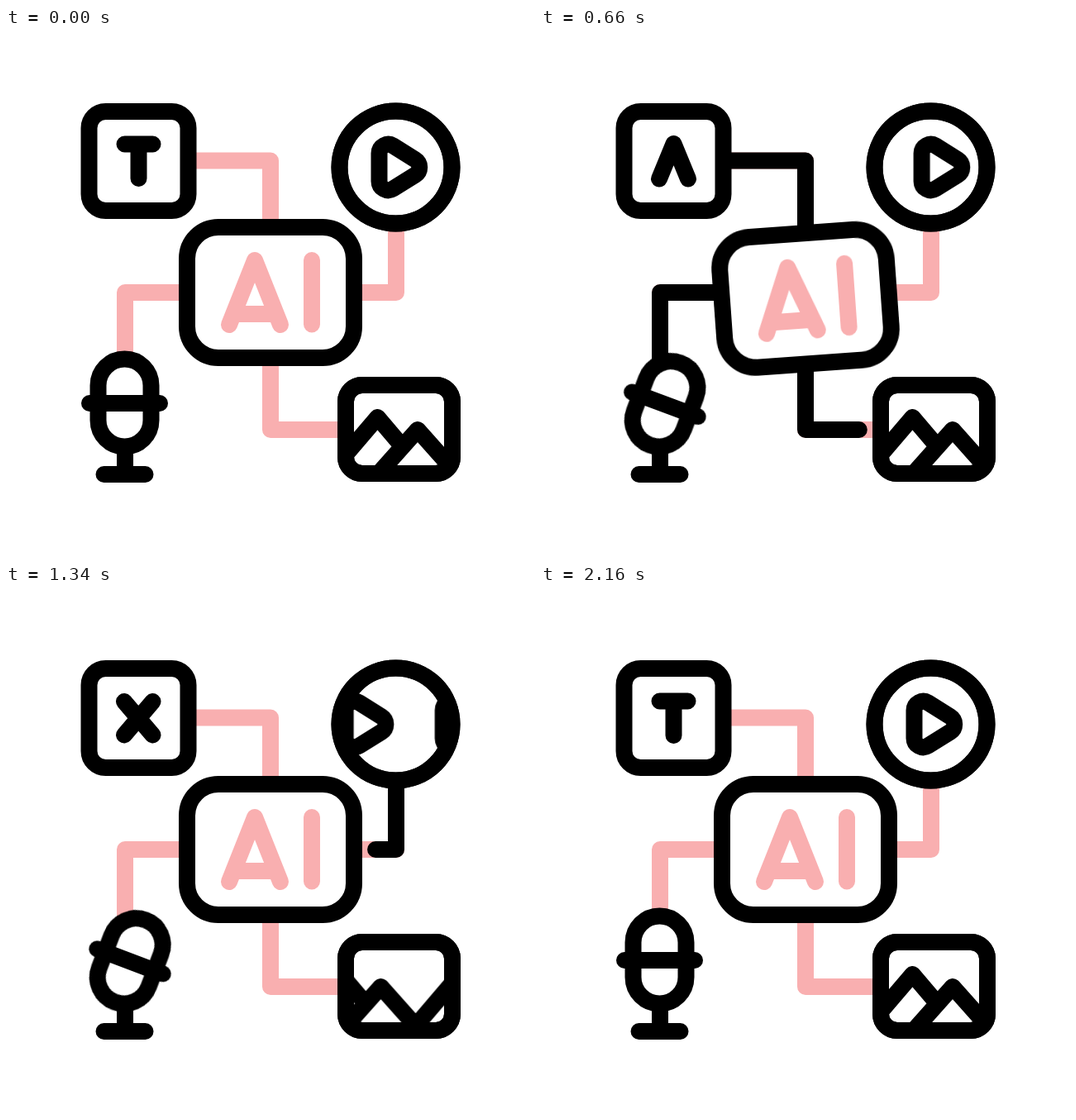
These frames come from a looping animation (640x640 px, 2400 ms). An HTML page:

```html
<!DOCTYPE html>
<html lang="en">
<head>
<meta charset="utf-8">
<title>AI media hub</title>
<style>
  html, body { margin: 0; width: 100%; height: 100%; overflow: hidden; background: #fff; }
  svg { display: block; width: 100vw; height: 100vh; }

  .ink, .pink { fill: none; stroke: #000; stroke-width: 20; stroke-linecap: round; stroke-linejoin: round; }
  .pink { stroke: #f9afb0; }
  .solid { fill: #fff; }

  .move, .trim { animation: 2400ms linear infinite; }
  .trim { stroke-dasharray: 100 300; stroke-dashoffset: 110; }

  /* Connectors: drawn away from the hub, then erased the same way */
  .to-text { animation-name: to-text; }
  .to-mic { animation-name: to-mic; }
  .to-image { animation-name: to-image; }
  .to-video { animation-name: to-video; }
  @keyframes to-text {
    0%, 6.667% { stroke-dashoffset: 110; }
    16.667%, 28.333% { stroke-dashoffset: 0; }
    38.333%, 100% { stroke-dashoffset: -110; }
  }
  @keyframes to-mic {
    0%, 12.5% { stroke-dashoffset: 110; }
    22.5%, 40% { stroke-dashoffset: 0; }
    50%, 100% { stroke-dashoffset: -110; }
  }
  @keyframes to-image {
    0%, 18.75% { stroke-dashoffset: 110; }
    28.75%, 44.167% { stroke-dashoffset: 0; }
    54.167%, 100% { stroke-dashoffset: -110; }
  }
  @keyframes to-video {
    0%, 27.5% { stroke-dashoffset: 110; }
    37.5%, 52.75% { stroke-dashoffset: 0; }
    62.75%, 100% { stroke-dashoffset: -110; }
  }

  /* Hub sway */
  .hub { transform-origin: 320px 320px; animation-name: sway; }
  @keyframes sway {
    0% { transform: translateY(0) rotate(0deg); animation-timing-function: cubic-bezier(.25, 0, .4, 1); }
    19.167% { transform: translateY(9.5px) rotate(-5.5deg); animation-timing-function: cubic-bezier(.75, 0, .65, 1); }
    40.833% { transform: translateY(-8px) rotate(5.7deg); animation-timing-function: ease-in-out; }
    55%, 100% { transform: translateY(0) rotate(0deg); }
  }

  /* Letters change in hard cuts */
  .glyph { visibility: hidden; animation-name: glyph; animation-timing-function: step-end; }
  .first { animation-name: first; }
  @keyframes glyph {
    0% { visibility: visible; }
    16.667%, 100% { visibility: hidden; }
  }
  @keyframes first {
    0% { visibility: visible; }
    16.667% { visibility: hidden; }
    66.667%, 100% { visibility: visible; }
  }

  /* Microphone tilt and sound rays */
  .mic { transform-origin: 143px 472.5px; animation-name: tilt; }
  @keyframes tilt {
    0%, 6.667% { transform: rotate(0deg); animation-timing-function: cubic-bezier(.37, 0, .63, 1); }
    35%, 47.083% { transform: rotate(24.3deg); animation-timing-function: cubic-bezier(.37, 0, .63, 1); }
    82.083%, 100% { transform: rotate(0deg); }
  }
  .ray { animation-name: ray; }
  @keyframes ray {
    0%, 34.583% { stroke-dashoffset: 110; }
    42.083%, 44.583% { stroke-dashoffset: 0; }
    50.833%, 100% { stroke-dashoffset: -110; }
  }

  /* Video: the ring and sign shrink, then signs run past */
  .ring { animation-name: ring; animation-timing-function: ease-in-out; }
  @keyframes ring {
    0%, .833%, 22.5%, 100% { r: 68px; }
    11.667% { r: 58px; }
  }
  .sign { vector-effect: non-scaling-stroke; }
  .shrink { transform-origin: 476px 168.5px; animation-name: shrink; animation-timing-function: ease-in-out; }
  @keyframes shrink {
    0%, .833%, 22.5%, 100% { transform: scale(1); }
    11.667% { transform: scale(.73); }
  }
  .signs { animation-name: run; }
  @keyframes run {
    0%, 20% { transform: translateX(0); animation-timing-function: cubic-bezier(.333, 0, .667, .4); }
    27.5% { transform: translateX(9px); animation-timing-function: cubic-bezier(.333, .168, .667, .457); }
    40.833% { transform: translateX(66px); animation-timing-function: cubic-bezier(.333, .27, .667, .823); }
    55.833% { transform: translateX(195px); animation-timing-function: cubic-bezier(.333, .95, .667, .79); }
    76.667% { transform: translateX(227px); animation-timing-function: cubic-bezier(.333, .444, .667, 1); }
    89.167%, 100% { transform: translateX(236px); }
  }

  /* Picture: the hills scroll by one period */
  .hills { animation-name: scroll; }
  @keyframes scroll {
    0%, 32.5% { transform: translateX(0); animation-timing-function: cubic-bezier(.37, 0, .63, 1); }
    70%, 100% { transform: translateX(144px); }
  }
</style>
</head>
<body>
<svg viewBox="0 0 640 640">
  <defs>
    <clipPath id="lens"><circle cx="471.5" cy="168.5" r="68"/></clipPath>
    <clipPath id="view"><rect x="411" y="432" width="129" height="107" rx="20"/></clipPath>
  </defs>

  <path class="pink" d="M320 260V160.5H221M250 320H144V404M320 380V486H411M390 320H472V236"/>
  <path class="ink trim to-text" pathLength="100" d="M320 260V160.5H221"/>
  <path class="ink trim to-mic" pathLength="100" d="M250 320H144V404"/>
  <path class="ink trim to-image" pathLength="100" d="M320 380V486H411"/>
  <path class="ink trim to-video" pathLength="100" d="M390 320H472V236"/>

  <g class="move hub">
    <rect class="ink solid" x="219" y="241" width="202" height="158" rx="38"/>
    <path class="pink" d="M270 359L301 281L332 359M277 346H325M370 281V358.5"/>
  </g>

  <rect class="ink solid" x="100.5" y="101" width="120" height="120" rx="20"/>
  <path class="ink move glyph first" d="M143.5 140.5H177.5M160.5 140.5V182"/>
  <path class="ink move glyph" style="animation-delay:-2000ms" d="M143 182.5L160.5 140L178 182.5"/>
  <path class="ink move glyph" style="animation-delay:-1600ms" d="M143.5 140.5H177.5M160.5 140.5V182M143.5 182H177.5"/>
  <path class="ink move glyph" style="animation-delay:-1200ms" d="M143 141L177.5 181.5M177.5 141L143 181.5"/>

  <path class="pink trim ray" pathLength="100" d="M73 391L40.6 371.8"/>
  <path class="pink trim ray" pathLength="100" d="M111 362L105 338"/>
  <path class="pink trim ray" pathLength="100" d="M67 436L41.8 443.2"/>
  <path class="ink" d="M144 507V540M118.5 540H168.5"/>
  <g class="move mic">
    <rect class="ink solid" x="111.5" y="400.5" width="64" height="106" rx="32"/>
    <path class="ink" d="M101 454H186"/>
  </g>

  <circle class="ink solid move ring" cx="471.5" cy="168.5" r="68"/>
  <g clip-path="url(#lens)">
    <g class="move shrink">
      <g class="move signs">
        <path id="sign" class="ink solid sign" d="M451.5 151.7A11 11 0 0 1 468.2 142.4L495.1 159.2A11 11 0 0 1 495.1 177.8L468.2 194.6A11 11 0 0 1 451.5 185.3Z"/>
        <use href="#sign" x="-118"/>
        <use href="#sign" x="-236"/>
      </g>
    </g>
  </g>
  <circle class="ink move ring" cx="471.5" cy="168.5" r="68"/>

  <rect class="ink solid" x="411" y="432" width="129" height="107" rx="20"/>
  <g clip-path="url(#view)">
    <g class="move hills">
      <path id="hills" class="ink" d="M394 536L449.5 471L475 501M453.5 536L498 486L542.5 536"/>
      <use href="#hills" x="-144"/>
    </g>
  </g>
  <rect class="ink" x="411" y="432" width="129" height="107" rx="20"/>
</svg>
</body>
</html>
```
